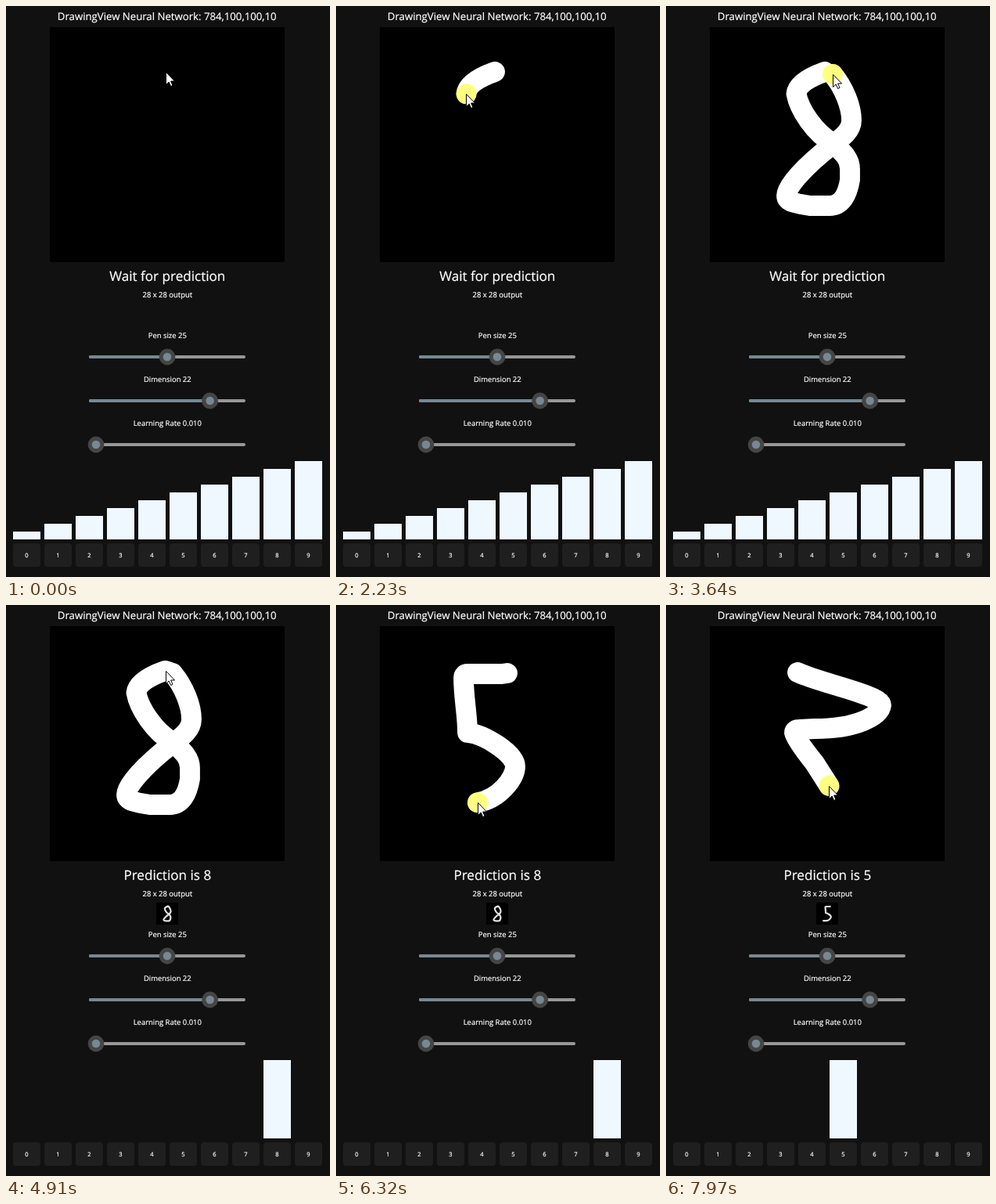
An HTML page for the animation above (8000 ms loop, 414 by 729 pixels).

```html
<!DOCTYPE html>
<html lang="en">
<head>
<meta charset="utf-8">
<title>Digit recognition</title>
<style>
  html, body { margin: 0; width: 100%; height: 100%; overflow: hidden; background: #111; }
  svg { display: block; width: 414px; height: 729px; }
  text { font-family: "Open Sans", "Noto Sans", sans-serif; fill: #fff; stroke: #fff; stroke-width: .2; text-anchor: middle; text-rendering: geometricPrecision; }
  .pen { fill: none; stroke: #fff; stroke-width: 25.8; stroke-linecap: round; stroke-linejoin: round; }
  .thumb { stroke-width: 20; opacity: .88; }
</style>
</head>
<body>
<svg id="stage" viewBox="0 0 414 729"></svg>
<script>
const LOOP = 8000;
const stage = document.getElementById('stage');

function add(tag, attrs, text) {
  const node = document.createElementNS('http://www.w3.org/2000/svg', tag);
  for (const name in attrs) node.setAttribute(name, attrs[name]);
  if (text !== undefined) node.textContent = text;
  return stage.appendChild(node);
}
const label = (y, size, text, x = 206.3) => add('text', { x, y, 'font-size': size }, text);
const show = (node, on) => node.setAttribute('visibility', on ? 'visible' : 'hidden');
const progress = (time, from, to) => Math.min(1, Math.max(0, (time - from) / (to - from)));
const easeOut = p => 1 - (1 - p) ** 2;

// Each move is start time, end time and path; the pen rests between moves.
const strokes = [
  {
    digit: 8, release: 3970,
    glide: [0, 1070, 'M204 84h0'],
    moves: [
      [1070, 1420, 'M203 84C183 91 168 100 166.5 112'],
      [2230, 3030, 'C170 132 190 162 213 175C225 186 235 194 235 208V222C232 240 225 255 209 255H184L172 253'],
      [3070, 3640, 'C164 251 154 250 154 242C154 229 180 204 199 188S237 163 237 146S228 105 213 87'],
      [3640, 3870, 'L204 84']
    ]
  },
  {
    digit: 5, release: 6480,
    glide: [4910, 5380, 'M204 84L219 87'],
    moves: [
      [5380, 5740, 'M219 87L212 88H168Q163 88 163 93'],
      [5740, 5780, 'C163 118 168 140 168 163'],
      [5880, 6440, 'C190 165 229 190 229 206C229 222 205 253 172 253H141']
    ]
  },
  {
    digit: 2, release: LOOP,
    glide: [7050, 7520, 'M141 253Q204 147 168 86'],
    moves: [
      [7520, 7820, 'M168 86C198 100 275 115 275 128'],
      [7820, 7970, 'C273 142 243 158 190 158L170 159Q164 159 164 163Q166 172 190 202L208.5 231']
    ]
  }
];

function slider(y, text, value) {
  const x = 115 + 182 * value;
  const track = { x: 106, y: y - 2, height: 4, rx: 2 };
  label(y - 24, 9.45, text);
  add('rect', { ...track, width: 200, fill: '#979797' });
  add('rect', { ...track, width: x - 106, fill: '#778892' });
  add('circle', { cx: x, cy: y, r: 10.4, fill: '#454545' });
  add('circle', { cx: x, cy: y, r: 5.3, fill: '#778892' });
}

label(18, 13.2, 'DrawingView Neural Network: 784,100,100,10', 205.7);
add('rect', { x: 56, y: 27, width: 300, height: 300, fill: '#000' });
const status = label(351, 17.1, '');
label(372, 9.45, '28 x 28 output');
slider(448, 'Pen size 25', 0.5);
slider(504, 'Dimension 22', 0.8);
slider(560, 'Learning Rate 0.010', 0);

const bars = [];
for (let i = 0; i < 10; i++) {
  const x = 9 + 40 * i;
  bars.push(add('rect', { x, width: 35, fill: '#f0f8ff' }));
  add('rect', { x, y: 686, width: 35, height: 30, rx: 4, fill: '#1f1f1f' });
  label(704, 7.5, i, x + 17.5);
}

const preview = add('rect', { x: 192, y: 380, width: 28, height: 28, fill: '#000' });
for (const stroke of strokes) {
  stroke.hoverPath = add('path', { d: stroke.glide[2], visibility: 'hidden' });
  stroke.ink = add('path', { class: 'pen' });
  let d = '', total = 0;
  stroke.parts = stroke.moves.map(([from, to, piece]) => {
    stroke.ink.setAttribute('d', d += piece);
    const length = stroke.ink.getTotalLength() - total;
    total += length;
    return { from, to, length };
  });
  const box = stroke.ink.getBBox();
  stroke.thumb = add('path', {
    class: 'pen thumb', d,
    transform: `translate(206 394) scale(.11) translate(${-box.x - box.width / 2} ${-box.y - box.height / 2})`
  });
}

const glow = add('circle', { r: 13, fill: '#ff0', opacity: 0.5 });
const arrow = add('path', {
  d: 'M.5 .5V16.5L4.2 13 6.6 18.5 9 17.4 6.6 12H11.5Z',
  fill: '#fff', stroke: '#000', 'stroke-width': 1
});

function render(time) {
  const current = strokes.filter(s => time >= s.glide[0]).pop();
  const drawn = strokes.filter(s => time >= s.parts[0].from).pop();
  const guess = strokes.filter(s => time >= s.release).pop();
  const pressed = current === drawn && time < current.release;

  const length = current.parts.reduce((sum, p) => sum + p.length * progress(time, p.from, p.to), 0);
  const [from, to] = current.glide;
  const tip = current === drawn
    ? current.ink.getPointAtLength(length)
    : current.hoverPath.getPointAtLength(current.hoverPath.getTotalLength() * easeOut(progress(time, from, to)));

  for (const stroke of strokes) {
    show(stroke.ink, stroke === drawn);
    show(stroke.thumb, stroke === guess);
  }
  if (current === drawn) current.ink.setAttribute('stroke-dasharray', `${Math.max(length, 0.01)} 2000`);

  arrow.setAttribute('transform', `translate(${Math.floor(tip.x + 0.05)} ${Math.floor(tip.y + 0.05)})`);
  glow.setAttribute('cx', tip.x);
  glow.setAttribute('cy', tip.y);
  show(glow, pressed);

  status.textContent = guess ? `Prediction is ${guess.digit}` : 'Wait for prediction';
  show(preview, guess);
  bars.forEach((bar, i) => {
    const height = guess ? (i === guess.digit ? 100 : 0) : 10 * (i + 1);
    bar.setAttribute('y', 681 - height);
    bar.setAttribute('height', height);
  });
}

const start = performance.now();
function tick() {
  render((performance.now() - start) % LOOP);
  requestAnimationFrame(tick);
}
tick();
</script>
</body>
</html>
```
